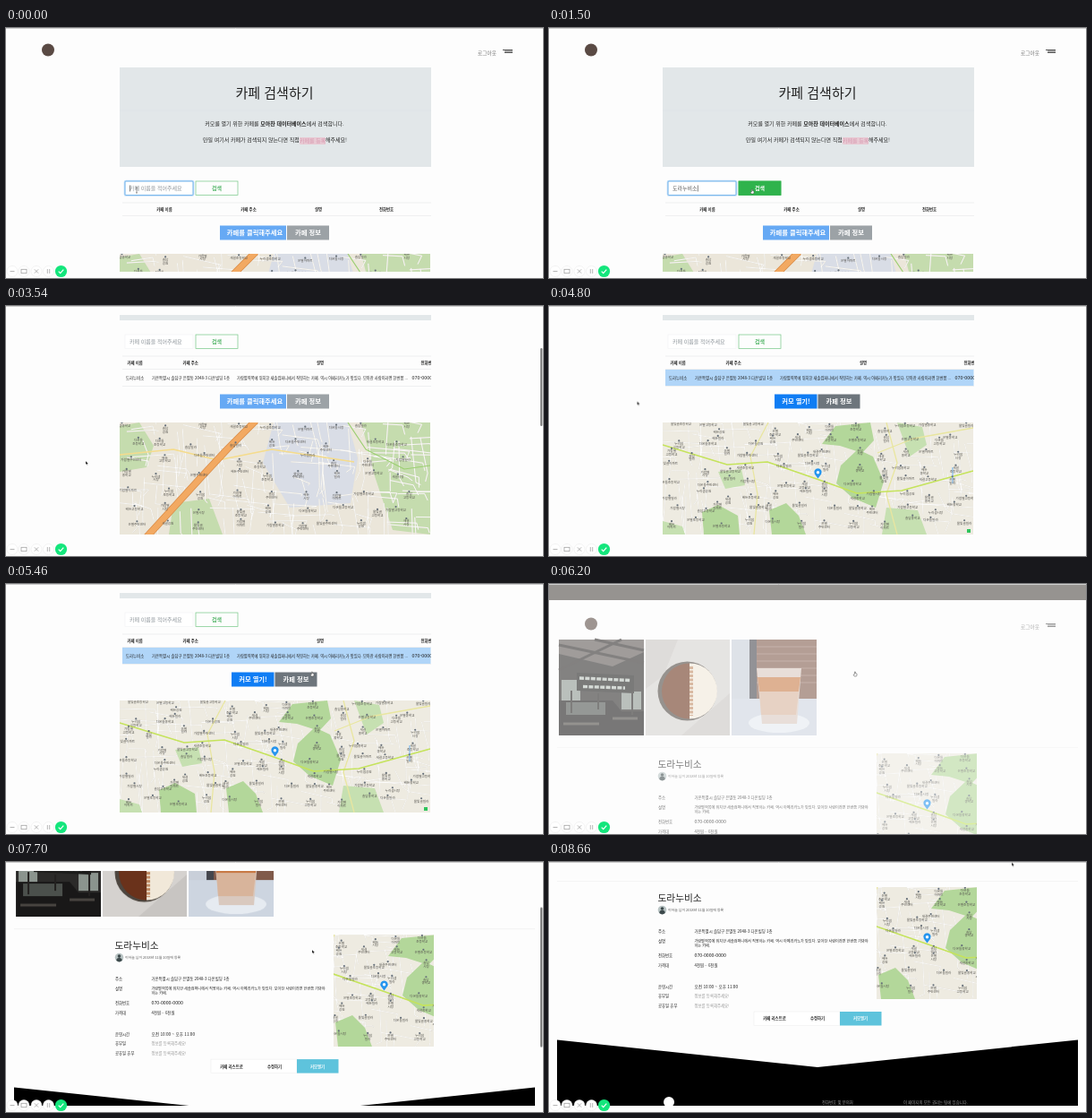
Write an HTML page that moves like this. It is 600 px wide and 279 px high and loops after 8.72 s.

```html
<!DOCTYPE html>
<html lang="ko">
<head>
<meta charset="utf-8">
<title>카페 검색</title>
<style>
html, body { margin: 0; width: 100%; height: 100%; overflow: hidden; background: #fdfdfd; }
svg { display: block; width: 600px; height: 279px; }
text { font-family: "Noto Sans CJK KR", "Noto Sans KR", "Noto Sans CJK", "Noto Sans", sans-serif; fill: #222; white-space: pre; }
.b { font-weight: 700; }
.m { text-anchor: middle; }
.t6 { font-size: 6px; }
.t4 { font-size: 4.4px; }
.btn { font-size: 7.3px; font-weight: 700; fill: #fff; text-anchor: middle; }
.place { font-size: 3.6px; fill: #55534e; text-anchor: middle; }
.dim { fill: #999; }

.step { animation: 8720ms step-end infinite; }
.move { animation: 8720ms linear infinite; }
#focus { animation-name: focus; }
#hot { animation-name: hot; }
.before { animation-name: before; }
.after { animation-name: after; }
#low { animation-name: low; }
.unpicked { animation-name: unpicked; }
.picked { animation-name: picked; }
#search { animation-name: search; }
#cafe { animation-name: cafe; }
#scroll1 { animation-name: scroll1; }
#scroll2 { animation-name: scroll2; }
#bar1 { animation-name: bar1; }
#bar2 { animation-name: bar2; }
#thumb1 { animation-name: thumb1; }
#thumb2 { animation-name: thumb2; }
#screen { animation-name: drop; }
#pointer { animation-name: pointer; }
#beam { animation-name: beam; }
#hand { animation-name: hand; }
#arrow { animation-name: arrow; }

@keyframes focus { 0% { opacity: 1 } 18%, 100% { opacity: 0 } }
@keyframes hot { 0% { opacity: 0 } 15.1% { opacity: 1 } 21.8%, 100% { opacity: 0 } }
@keyframes before { 0% { opacity: 1 } 20.07%, 100% { opacity: 0 } }
@keyframes after { 0% { opacity: 0 } 20.07%, 100% { opacity: 1 } }
@keyframes low { 0% { transform: none } 20.07%, 100% { transform: translateY(17px) } }
@keyframes unpicked { 0% { opacity: 1 } 46.2%, 100% { opacity: 0 } }
@keyframes picked { 0% { opacity: 0 } 46.2%, 100% { opacity: 1 } }
@keyframes search { 0% { opacity: 1 } 69.72%, 100% { opacity: 0 } }
@keyframes cafe { 0%, 69.71% { opacity: 0 } 69.72% { opacity: .4 } 74.3%, 100% { opacity: 1 } }
@keyframes scroll1 { 0%, 29.13% { transform: none } 39.39%, 100% { transform: translateY(-139px) } }
@keyframes thumb1 { 0%, 29.13% { transform: none } 39.39%, 100% { transform: translateY(47px) } }
@keyframes scroll2 { 0%, 79.22% { transform: none } 93.81%, 100% { transform: translateY(-141px) } }
@keyframes thumb2 { 0%, 79.22% { transform: none } 93.81%, 100% { transform: translateY(78px) } }
@keyframes bar1 { 0%, 28.9% { opacity: 0 } 29.1%, 40.5% { opacity: 1 } 42.5%, 100% { opacity: 0 } }
@keyframes bar2 { 0%, 79% { opacity: 0 } 79.2%, 94.5% { opacity: 1 } 97%, 100% { opacity: 0 } }
@keyframes drop {
  0%, 69.71% { transform: none }
  69.72%, 73.4% { transform: translateY(20px) }
  75.2%, 100% { transform: none }
}
@keyframes pointer {
  0%, 12.4% { transform: translate(146px, 181px); animation-timing-function: ease-in-out }
  15.8%, 21.2% { transform: translate(227px, 180px); animation-timing-function: ease-in-out }
  27.5%, 41.3% { transform: translate(89px, 173px); animation-timing-function: ease-in-out }
  45.3%, 47.2% { transform: translate(140px, 82px); animation-timing-function: ease-in-out }
  51.1%, 56.2% { transform: translate(98.5px, 106.5px); animation-timing-function: ease-in-out }
  61.9%, 93.8% { transform: translate(342px, 98px); animation-timing-function: ease-in-out }
  98.2%, 100% { transform: translate(517px, .5px) }
}
@keyframes beam { 0% { opacity: 1 } 13.4%, 100% { opacity: 0 } }
@keyframes hand { 0% { opacity: 0 } 15.1% { opacity: 1 } 21.8% { opacity: 0 } 61% { opacity: 1 } 75.2%, 100% { opacity: 0 } }
@keyframes arrow { 0% { opacity: 0 } 13.4% { opacity: 1 } 15.1% { opacity: 0 } 21.8% { opacity: 1 } 61% { opacity: 0 } 75.2%, 100% { opacity: 1 } }
</style>
</head>
<body>
<svg viewBox="0 0 600 279">
  <defs>
    <clipPath id="view"><rect x="9" y="10" width="582" height="262"/></clipPath>
    <clipPath id="wide"><rect width="347" height="125"/></clipPath>
    <clipPath id="narrow"><rect x="117" width="112" height="125"/></clipPath>
    <clipPath id="table"><rect x="127" y="190" width="347.5" height="45"/></clipPath>
    <g id="header">
      <circle cx="47" cy="24.5" r="7" fill="#5a4a44"/>
      <text x="527" y="30" font-size="5.7" style="fill:#777">로그아웃</text>
      <path d="M555 24.5h11M557 26h9M557 27.5h9" stroke="#444" stroke-width=".9"/>
    </g>
    <g id="town"></g>
  </defs>

  <rect width="600" height="279" fill="#fdfdfd"/>
  <g id="screen" class="move">
    <rect y="-20" width="600" height="18" fill="#969390"/>
    <g clip-path="url(#view)">

      <g id="search" class="step"><g id="scroll1" class="move">
        <use href="#header"/>
        <rect x="127" y="44" width="348" height="111" fill="#e2e7e9"/>
        <path d="M127 92h348" stroke="#d9dfe2" stroke-width=".5"/>
        <text class="m" x="300" y="78" font-size="15">카페 검색하기</text>
        <text class="t6 m" x="300" y="109">커모를 열기 위한 카페를 <tspan class="b">모아찬 데이터베이스</tspan>에서 검색합니다.</text>
        <text class="t6" x="220" y="127">만일 여기서 카페가 검색되지 않는다면 직접</text>
        <rect x="328" y="122" width="29" height="8" rx="1" fill="#e8c9d3"/>
        <text class="t6" x="328" y="127.5" style="fill:#d79ab0">카페를 등록</text>
        <text class="t6" x="357" y="127">해주세요!</text>

        <rect x="133" y="171" width="76" height="15.5" fill="#fff" stroke="#f1f2f3" stroke-width=".6"/>
        <g id="focus" class="step" fill="none">
          <rect x="132.5" y="170.5" width="77" height="16.5" rx="1.5" stroke="#bfdcf8" stroke-width="1.6"/>
          <rect x="133" y="171" width="76" height="15.5" rx="1" stroke="#66aee9" stroke-width=".8"/>
        </g>
        <text id="query" class="t6" x="138" y="181.2"></text>
        <rect id="caret" y="175.5" width=".6" height="7" fill="#333"/>
        <rect x="212" y="171" width="47" height="15.5" fill="#fdfdfd" stroke="#74c685" stroke-width=".7"/>
        <text class="t6 m b" x="235.5" y="181.2" style="fill:#53b568">검색</text>
        <g id="hot" class="step">
          <rect x="211.6" y="170.6" width="47.8" height="16.3" fill="#2fb34c"/>
          <text class="t6 m b" x="235.5" y="181.2" style="fill:#fff">검색</text>
        </g>

        <path d="M130 195h345M130 209.5h345" stroke="#e6e8ea" stroke-width=".6"/>
        <g class="before step"><g class="t4 b m">
          <text x="177" y="203.6">카페 이름</text><text x="271" y="203.6">카페 주소</text>
          <text x="349" y="203.6">설명</text><text x="425" y="203.6">전화번호</text>
        </g></g>
        <g class="after step" clip-path="url(#table)">
          <rect class="picked step" x="130" y="210" width="344.5" height="18" fill="#b0d5f8"/>
          <g class="t4 b">
            <text x="135.5" y="203.6">카페 이름</text><text x="197.5" y="203.6">카페 주소</text>
            <text x="347" y="203.6">설명</text><text x="463.5" y="203.6">전화번호</text>
          </g>
          <g class="t4">
            <text x="134" y="220.7">도라누비소</text>
            <text x="163" y="220.7">가온특별시 솔담구 은별동 2048-3 다온빌딩 1층</text>
            <text x="258" y="220.7" font-size="4.25">가람별역쪽에 위치한 새솔컴퍼니에서 직영하는 카페. 역시 아메리카노가 맛있다. 모아찬 사람이라면 한번쯤 ...</text>
            <text x="453.5" y="220.7" font-size="5.4">070-0000-0000</text>
          </g>
          <path d="M130 228.5h345" stroke="#e6e8ea" stroke-width=".6"/>
        </g>

        <g id="low" class="step">
          <g class="unpicked step">
            <rect x="239" y="220.5" width="74" height="16" fill="#66a9f4"/>
            <rect x="314" y="220.5" width="47" height="16" fill="#9ca2a6"/>
            <text class="btn" x="278" y="231.3">카페를 클릭해주세요</text>
            <text class="btn" x="337.5" y="231.3">카페 정보</text>
          </g>
          <g class="picked step">
            <rect x="252" y="220.5" width="47.5" height="16" fill="#0f7df4"/>
            <rect x="300.5" y="220.5" width="47" height="16" fill="#6d757c"/>
            <text class="btn" x="276" y="231.3">커모 열기!</text>
            <text class="btn" x="324" y="231.3">카페 정보</text>
          </g>
          <g transform="translate(127 252)" clip-path="url(#wide)">
            <g id="city"></g>
            <g class="picked step"><use href="#town"/></g>
          </g>
        </g>
      </g></g>

      <g id="cafe" class="move"><g id="scroll2" class="move">
        <use href="#header"/>
        <g transform="translate(11 42)">
          <rect width="95" height="107" fill="#2b2a29"/>
          <path d="M0 0H95V14L60 30 0 16Z" fill="#5d5754"/>
          <path d="M0 6 95 26M0 34 70 0M40 0 95 12" stroke="#2b2827" stroke-width="3"/>
          <path d="M3 45H24V70H3ZM70 58H92V78H70Z" fill="#8b948e"/>
          <path d="M20 37 84 40V60L20 57Z" fill="#1c1c1b"/>
          <path d="M23 43 80 45.5M27 52.5 74 54" stroke="#b9c2bb" stroke-width="3.4" stroke-dasharray="5 1.4"/>
          <path d="M0 68H60L70 80H95V107H0Z" fill="#191818"/>
          <path d="M8 70H52V84H8Z" fill="#4b504c"/>
          <path d="M14 57V82M44 60V78M82 58V84" stroke="#232120" stroke-width="2"/>
          <path d="M5 94H45M60 88H88" stroke="#494541" stroke-width="3"/>
        </g>
        <g transform="translate(108 42)">
          <rect width="94" height="107" fill="#d5d2cf"/>
          <path d="M0 0H36L20 40 0 55ZM94 60V107H40Z" fill="#c8c5c2"/>
          <circle cx="46.5" cy="57.5" r="33" fill="#4d463f"/>
          <path d="M49 26.5A31 31 0 0 0 49 88.5Z" fill="#6a321b"/>
          <path d="M49 26.5A31 31 0 0 1 49 88.5Z" fill="#f1e8d9"/>
          <path d="M51 30V85" stroke="#c08a62" stroke-width="4" stroke-dasharray="3 1.5"/>
        </g>
        <g transform="translate(204 42)">
          <rect width="95" height="107" fill="#c9cfd9"/>
          <path d="M28 0H95V66H28Z" fill="#805a4a"/>
          <path d="M28 8H95M28 16H95M28 24H95M28 32H95M28 40H95M28 48H95" stroke="#a5877a" stroke-width=".8"/>
          <path d="M20 0H28V66H20Z" fill="#45464c"/>
          <path d="M0 66H95V107H0Z" fill="#cdd5e0"/>
          <ellipse cx="53" cy="93" rx="34" ry="11" fill="#e6ebf1"/>
          <path d="M28 32H78L73 94H34Z" fill="#d9c9bf"/>
          <path d="M29 42H77L75 58H31Z" fill="#c87a45"/>
          <path d="M31 58H75L72 84H33Z" fill="#d8b49b"/>
        </g>
        <path d="M9 162.5H591" stroke="#efefef" stroke-width=".7"/>
        <text x="121.5" y="185.2" font-size="10.7">도라누비소</text>
        <circle cx="126.5" cy="194.5" r="4.8" fill="#b9c4c4"/>
        <path d="M123.3 198a3.2 3.2 0 0 1 6.4 0A4.8 4.8 0 0 1 123.3 198Z" fill="#3d4a4c"/>
        <circle cx="126.5" cy="193" r="1.8" fill="#3d4a4c"/>
        <text x="133" y="196" font-size="3.9" style="fill:#555">이하늘 님이 2018년 11월 10일에 등록</text>
        <g id="facts" class="t4"></g>
        <g transform="translate(249 169)"><g clip-path="url(#narrow)"><use href="#town"/></g></g>
        <rect x="229" y="308" width="96" height="15.5" fill="#fff" stroke="#eee" stroke-width=".6"/>
        <rect x="325" y="308" width="46.5" height="15.5" fill="#5ec3dc"/>
        <g class="t4 m b">
          <text x="252" y="317.4">카페 리스트로</text><text x="300" y="317.4">수정하기</text>
          <text x="348" y="317.4" style="fill:#fff">커모열기</text>
        </g>
        <path d="M9 339.5 300 370 591 339.5V480H9Z"/>
        <circle cx="134" cy="409" r="6" fill="#fff"/>
        <text x="305" y="410.5" class="t4 dim">전화번호 및 문의처</text>
        <text x="396" y="410.5" class="t4 dim">이 페이지의 모든 권리는 팀에 있습니다.</text>
      </g></g>
    </g>
  </g>

  <path d="M0 .5H600" stroke="#cfcfcf"/>
  <g id="bar1" class="move"><rect id="thumb1" class="move" x="597" width="2.4" height="87" rx="1.2" fill="#7d7d7d"/></g>
  <g id="bar2" class="move"><rect id="thumb2" class="move" x="597" y="2" width="2.4" height="156" rx="1.2" fill="#7d7d7d"/></g>

  <g stroke="#a2a2a2" stroke-width=".8" fill="none">
    <g fill="#fff" stroke="#e6e6e6" stroke-width=".5">
      <circle cx="7" cy="271.5" r="6"/><circle cx="20" cy="271.5" r="6"/>
      <circle cx="34" cy="271.5" r="6"/><circle cx="47.5" cy="271.5" r="6"/>
    </g>
    <path d="M4.5 271.5h5M31.8 269.3l4.4 4.4M36.2 269.3l-4.4 4.4M46.3 269v5M48.7 269v5"/>
    <rect x="17" y="269.3" width="6" height="4.4"/>
    <circle cx="61.5" cy="271.5" r="6.6" fill="#14e67c" stroke="none"/>
    <path d="M58.7 271.6l2 2 3.6-3.9" stroke="#fff" stroke-width="1.2"/>
  </g>

  <g id="pointer" class="move">
    <path id="beam" class="step" d="M-1-3H1M0-3V3M-1 3H1" stroke="#555" stroke-width=".6"/>
    <path id="hand" class="step" d="M-.6 0H.4V1.7L2 2.1V4L1.4 5H-.8L-2 3.2-.6 2.8Z" fill="#fff" stroke="#444" stroke-width=".5"/>
    <path id="arrow" class="step" d="M0 0V4L1 3.1 1.7 4.6 2.4 4.3 1.7 2.9H3Z" fill="#111" stroke="#fff" stroke-width=".25"/>
  </g>
</svg>

<script>
const $ = id => document.getElementById(id);
const random = seed => () => (seed = seed * 16807 % 2147483647) / 2147483647;
const pick = (list, r) => list[Math.floor(r() * list.length)];
const line = (d, color, width) =>
  `<path d="${d}" fill="none" stroke="${color}" stroke-width="${width}" stroke-linejoin="round"/>`;
const area = (color, ...shapes) => shapes.map(p => `<polygon points="${p}" fill="${color}"/>`).join('');

const heads = ['은별', '솔담', '다온들', '새결', '가람별', '물빛골', '누리샘', '해든'];
const tails = ['초등학교', '주민센터', '아파트', '중학교', '공원', '시장', '고등학교', '빌라'];

// Short bent lanes scattered over the whole map.
function streets(r) {
  let d = '';
  for (let i = 0; i < 150; i++) {
    const steep = r() < .5, long = 15 + r() * 40, slant = (r() - .3) * 14;
    const step = steep ? `${slant} ${long}` : `${long} ${slant}`;
    d += `M${r() * 360 - 15} ${r() * 130 - 15}l${step} ${(r() - .5) * 12} ${r() * 14}`;
  }
  return line(d, '#d8d4c9', 1.1) + line(d, '#fff', .8);
}

function places(r, dx, dy) {
  let out = '';
  for (let y = 7; y < 124; y += dy)
    for (let x = 12; x < 345; x += dx) {
      const px = x + (r() - .5) * 20, py = y + (r() - .5) * 10;
      const name = (text, dy) => `<text class="place" x="${px}" y="${py + dy}">${text}</text>`;
      const head = pick(heads, r), tail = pick(tails, r);
      out += `<circle cx="${px}" cy="${py - 4.4}" r="1.1" fill="#66707a"/>` +
        (r() < .5 ? name(head + tail, 0) : name(head, 0) + name(tail, 3.8));
    }
  return out;
}

function drawCity() {
  const r = random(71);
  const road = 'M152 -2 120 30 92 60 30 128';
  return '<rect width="347" height="125" fill="#ebe6da"/>' +
    area('#d9dde6', '172,0 255,0 266,40 258,90 190,95 160,45') +
    area('#c5dcae', '0,4 22,0 38,26 30,50 0,55', '270,0 347,0 347,125 305,120 285,60', '60,90 100,85 115,125 55,125') +
    streets(r) +
    line('M0 36 60 30 110 42 170 30 262 44', '#f5dc8c', 1.6) +
    line('M255 0 275 30 318 52 347 48', '#9ccf72', 1.2) +
    line(road, '#d98b46', 8) + line(road, '#f2a962', 6.6) +
    places(r, 38, 18);
}

function drawTown() {
  const r = random(23);
  return '<rect width="347" height="125" fill="#eeebe1"/>' +
    streets(r) +
    area('#b3d79a', '178,24 193,4 232,0 236,20 223,34 198,26', '199,48 218,30 235,38 247,66 238,95 212,84 194,68',
      '44,100 62,92 84,104 86,125 46,125', '119,98 138,90 152,104 160,125 122,125') +
    area('#c6e0b1', '262,0 290,5 295,25 276,38', '62,55 88,52 92,70 70,74', '250,95 285,98 295,125 245,125', '0,110 22,116 25,125 0,125') +
    line('M102 125 106 80 98 38 118 0M250 0 262 45 250 80 262 125M240 34 280 18 347 6', '#e9e6a0', 1.3) +
    line('M0 25 72 47 117 44 172 63 217 79 267 76 347 54', '#c5e35c', 1.6) +
    line('M324 50V68', '#9cc9ee', 1.6) +
    places(r, 29, 15) +
    '<path d="M173.5 62.5 169.8 57.5A4.2 4.2 0 1 1 177.2 57.5Z" fill="#2595ee"/><circle cx="173.5" cy="55.7" r="1.7" fill="#fff"/>' +
    '<rect x="340" y="119" width="4" height="4" fill="#2fc45c"/>';
}

const facts = [
  [218, '주소', '가온특별시 솔담구 은별동 2048-3 다온빌딩 1층'],
  [229, '설명', '가람별역쪽에 위치한 새솔컴퍼니에서 직영하는 카페. 역시 아메리카노가 맛있다. 모아찬 사람이라면 한번쯤 가봐야', 4.15],
  [234.5, '', '하는 카페.', 4.15],
  [245, '전화번호', '070-0000-0000', 5.2],
  [256, '가격대', '4천원 ~ 6천원'],
  [280, '운영시간', '오전 10:00 ~ 오후 11:00', 4.7],
  [290, '휴무일', '정보를 등록해주세요!'],
  [301, '공휴일 휴무', '정보를 등록해주세요!']
];

$('city').innerHTML = drawCity();
$('town').innerHTML = drawTown();
$('facts').innerHTML = facts.map(([y, label, value, size = 4.4]) =>
  `<text x="122" y="${y + 1.6}">${label}</text>` +
  `<text x="162.5" y="${y + 1.6}" font-size="${size}"${y > 285 ? ' class="dim"' : ''}>${value}</text>`).join('');

// Typing follows the clock of the scroll animation, syllables composing as keys land.
const typed = ['ㄷ', '도', '돌', '도라', '도란', '도라누', '도라눕', '도라누비', '도라누빗', '도라누비소'];
const clock = $('scroll1').getAnimations()[0];
const query = $('query'), caret = $('caret');

function type() {
  const t = (clock.currentTime || 0) % 8720;
  const keys = t < 1750 ? Math.min(typed.length, Math.floor((t - 60) / 95)) : 0;
  const text = keys > 0 ? typed[keys - 1] : '';
  query.textContent = text || '카페 이름을 적어주세요';
  query.style.fill = text ? '#555' : '#8d949a';
  caret.setAttribute('x', 138.3 + text.length * 5.52);
  caret.style.opacity = t < 1560 && (t < 1060 || t > 1400) ? 1 : 0;
  requestAnimationFrame(type);
}
type();
</script>
</body>
</html>
```
